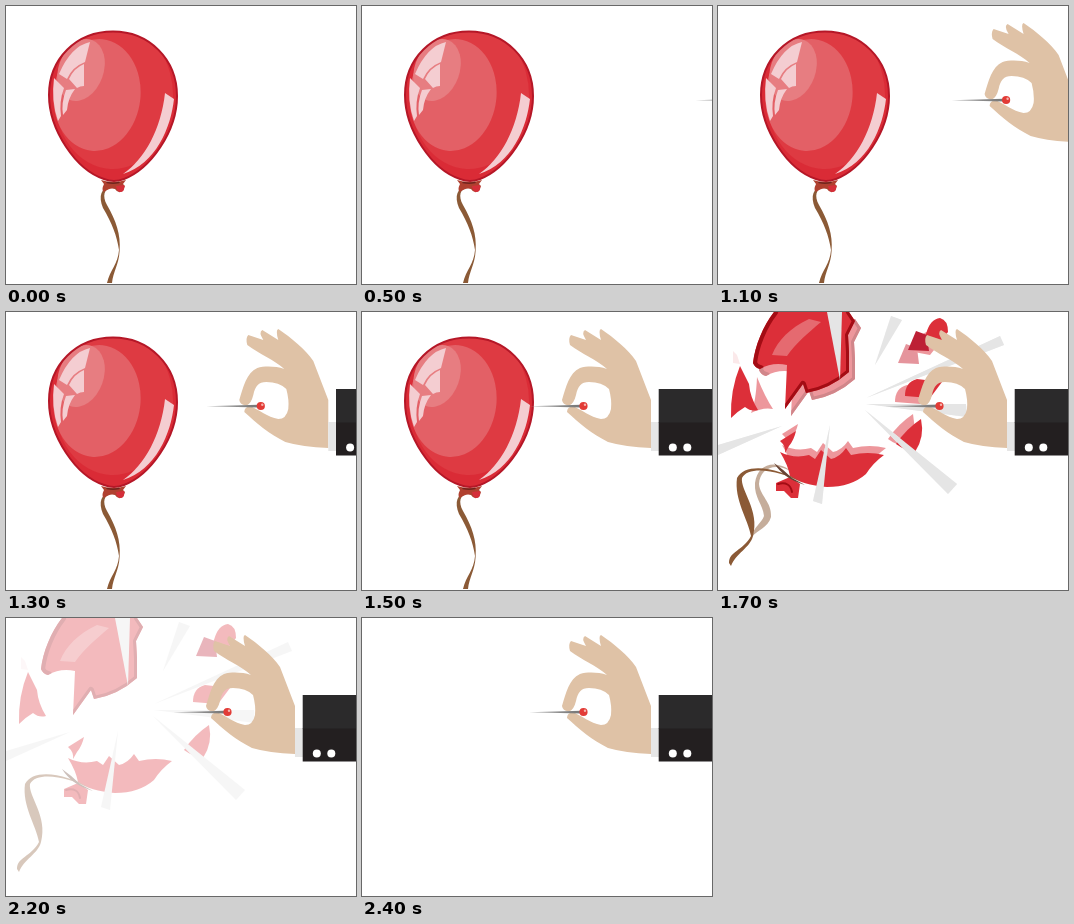
Animation, 350 px wide and 278 px high, one loop 2.9 s. Source, as an HTML page with a canvas:

```html
<!DOCTYPE html>
<html lang="en">
<head>
<meta charset="utf-8">
<title>Balloon and pin</title>
<style>
html, body { margin: 0; width: 100%; height: 100%; overflow: hidden; background: #fff; }
canvas { display: block; width: 350px; height: 278px; }
</style>
</head>
<body>
<canvas id="stage" width="350" height="278"></canvas>
<script>
const ctx = document.getElementById('stage').getContext('2d');
const LOOP = 2900, STEP = 100;
const RED = '#dc2f39', DARK = '#b51727', DEEP = '#a30c14', BROWN = '#8b5a36', SKIN = '#dfc2a6';

function fill(d, color) {
  ctx.fillStyle = color;
  ctx.fill(new Path2D(d));
}

function stroke(d, color, width) {
  ctx.strokeStyle = color;
  ctx.lineWidth = width;
  ctx.lineJoin = ctx.lineCap = 'round';
  ctx.stroke(new Path2D(d));
}

function ellipse(x, y, rx, ry, angle, color) {
  ctx.fillStyle = color;
  ctx.beginPath();
  ctx.ellipse(x, y, rx, ry, angle, 0, Math.PI * 2);
  ctx.fill();
}

function shifted(dx, dy, draw) {
  ctx.save();
  ctx.translate(dx, dy);
  draw();
  ctx.restore();
}

function clipped(d, draw) {
  ctx.save();
  ctx.clip(new Path2D(d));
  draw();
  ctx.restore();
}

function veil(alpha) {
  ctx.fillStyle = `rgba(255, 255, 255, ${alpha})`;
  ctx.fillRect(0, 0, 350, 278);
}

// Balloon
const BODY = 'M107 25.5C143 25.5 171 53 171 90C171 126 144 163 118 173Q108 177 98 173C70 164 43 124 43 89C43 53 70 25.5 107 25.5Z';

function drawBalloon() {
  fill('M106 182C98 182 96 190 101 199C110 215 115 228 113.6 245C113 258 107 266 106 277L101 277C104 264 112 258 113 244C111 230 106 217 97 202C92 190 95 181 106 180Z', BROWN);
  fill(BODY, '#da2b36');
  clipped(BODY, () => {
    ellipse(108, 91, 59, 72, 0.05, '#de3a42');
    ellipse(91, 89, 43.5, 56, 0.1, '#e36066');
    ellipse(75, 64, 22.5, 32, 0.35, '#e77d81');
  });
  const glass = '#f4cdd1';
  fill('M84 36Q65 40 53 68L61 73Q66 61 79 56Z', glass);
  fill('M78 58Q68 62 63 73L71 82Q74 80 78 80Z', glass);
  fill('M48 72L58 82Q53 95 55 110L52 115Q45 95 48 72Z', glass);
  fill('M60 84L69 83Q62 92 61 104L57 109Q55 97 60 84Z', glass);
  fill('M159 87L168 93C165 121 150 158 117 168C139 153 155 123 159 87Z', glass);
  stroke(BODY, DARK, 2);
  fill('M95 174Q107 178 120 174L117 178L119 180Q118 183 117 185Q112 188 109 183Q104 181 98 186Q95 184 98 178Z', '#b0402f');
  fill('M110 180L118 179Q119 185 115 186Q111 186 110 180Z', '#d52e39');
  stroke('M101 176.5Q107 178 113 176.5', '#70251f', 1.5);
}

// Burst pieces
const SHARD = 'M56 0C45 14 37 34 35 51Q37 56 42 57Q54 50 69 53L67 97L85 72L88 81Q112 77 131 60L131 40L130 23L137 9L131 0Z';
const SIDE = 'M22 54Q12 78 13 106Q20 99 27 95Q33 100 40 98Q32 85 31 72Z';
const LOWER = 'M62 140Q76 147 91 143L97 147L103 138L113 147Q122 145 128 136L133 143Q150 139 166 143Q155 151 148 162Q133 175 109 175Q84 173 72 164Q70 153 62 140Z';
const CHIP = 'M62 129L78 119Q76 128 71 134L67 141Q68 134 62 129Z';
const TOP_LEFT = 'M190 38L198 19L209 23L211 39Z';
const TOP_RIGHT = 'M208 22Q212 7 222 6Q230 8 230 20L222 30L206 27Z';
const EDGE = 'M178 132Q188 117 203 107Q207 125 197 140Q186 138 178 132Z';
const MIDDLE = 'M187 84Q187 70 199 67L224 70L212 86Z';

function drawShard() {
  fill(SHARD, RED);
  clipped(SHARD, () => {
    stroke('M56 0C45 14 37 34 35 51Q37 56 42 57', DEEP, 8);
    stroke('M67 97L85 72L88 81Q112 77 131 60L131 40L130 23L137 9L131 0', DEEP, 6);
  });
  fill('M54 43C60 28 72 16 91 7L103 10C90 21 78 31 69 44Z', '#e56a70');
}

function drawRays() {
  const rays = [
    'M64 114L0 133V143Z', 'M109 0H124L122 68Z', 'M157 53L173 4L184 8Z',
    'M148 86L282 24L286 33Z', 'M148 92L248 92L249 105Z',
    'M147 98L239 172L230 182Z', 'M112 113L95 189L104 192Z'
  ];
  for (const d of rays) fill(d, '#e5e5e5');
}

function drawEarlyBurst() {
  shifted(6, 7, drawShard);
  fill('M39 65Q38 90 33 101Q45 95 55 97Q47 85 39 65Z', RED);
  shifted(2, -7, () => { fill(LOWER, RED); fill(CHIP, RED); });
  shifted(-10, 13, () => { fill(TOP_LEFT, '#cc2838'); fill(TOP_RIGHT, RED); });
  shifted(-8, -5, () => fill(EDGE, RED));
  shifted(-10, 6, () => fill(MIDDLE, RED));
  fill('M80 164C60 148 42 155 41 172C42 184 54 190 53 205C50 216 39 218 34 225C35 215 44 211 46 204C45 192 36 186 37 171C40 150 60 146 80 164Z', BROWN);
  drawRays();
}

function drawBurst() {
  drawShard();
  for (const d of [SIDE, CHIP, LOWER, TOP_RIGHT, EDGE, MIDDLE]) fill(d, RED);
  fill(TOP_LEFT, '#bd2035');
  fill('M15 39L19 43L22 52L15 51Z', '#fbe9ea');
  fill('M58 171L72 165L82 172L80 186L73 186L66 179L58 179Z', RED);
  stroke('M60 172Q72 169 74 180', DEEP, 2);
  fill('M85 171C62 158 30 153 24 166C22 178 42 198 35 224C32 236 18 241 13 254L11 251C11 239 25 239 33 224C30 207 16 188 19 166C27 150 60 155 85 171Z', BROWN);
  fill('M56 151Q66 158 74 166L87 173Q66 167 56 151Z', '#684334');
  drawRays();
}

// Hand with pin, at its resting place
function drawHand() {
  fill('M289 88L274 49C266 37 252 26 239 17Q236 18 239 28L223 18Q219 20 224 28L209 23Q206 26 208 33C220 42 235 48 245 57C236 54 225 54 218 56C207 61 204 75 200 88Q201 94 208 93Q212 91 214 83C216 74 219 70 227 70Q240 70 247 77Q250 88 249 97Q247 107 239 107C228 105 220 98 211 94Q205 95 205 100C217 111 230 122 246 130Q263 135 289 136Z', SKIN);
  fill('M289 110H297V139H289Z', '#e6e6e6');
  fill('M296.7 77H400V111H296.7Z', '#2b2a2b');
  fill('M296.7 110.5H400V143.5H296.7Z', '#231f20');
  ellipse(310.8, 135.5, 4, 4, 0, '#fff');
  ellipse(325.3, 135.5, 4, 4, 0, '#fff');
  const steel = ctx.createLinearGradient(168, 0, 218, 0);
  steel.addColorStop(0, '#aaa');
  steel.addColorStop(1, '#777');
  fill('M167 94.2L219 92.8V95.4Z', steel);
  ellipse(221.5, 94, 4.1, 4.1, 0, '#e23b36');
  ellipse(223, 92.7, 1.2, 1.2, 0, '#f5b3ac');
}

function render(time) {
  const t = Math.floor(time % LOOP / STEP) * STEP;
  ctx.fillStyle = '#fff';
  ctx.fillRect(0, 0, 350, 278);

  if (t < 1600) {
    drawBalloon();
  } else if (t < 1700) {
    drawEarlyBurst();
  } else if (t < 2400) {
    if (t < 1800) {
      drawEarlyBurst();
      veil(0.5);
    }
    drawBurst();
    veil(Math.max(0, (t - 1800) / 600));
  }

  if (t >= 500) {
    const distance = Math.max(0, 1500 - t) * 0.1665;
    shifted(distance, 0, drawHand);
  }
}

const start = performance.now();
function tick() {
  render(performance.now() - start);
  requestAnimationFrame(tick);
}
tick();
</script>
</body>
</html>
```
